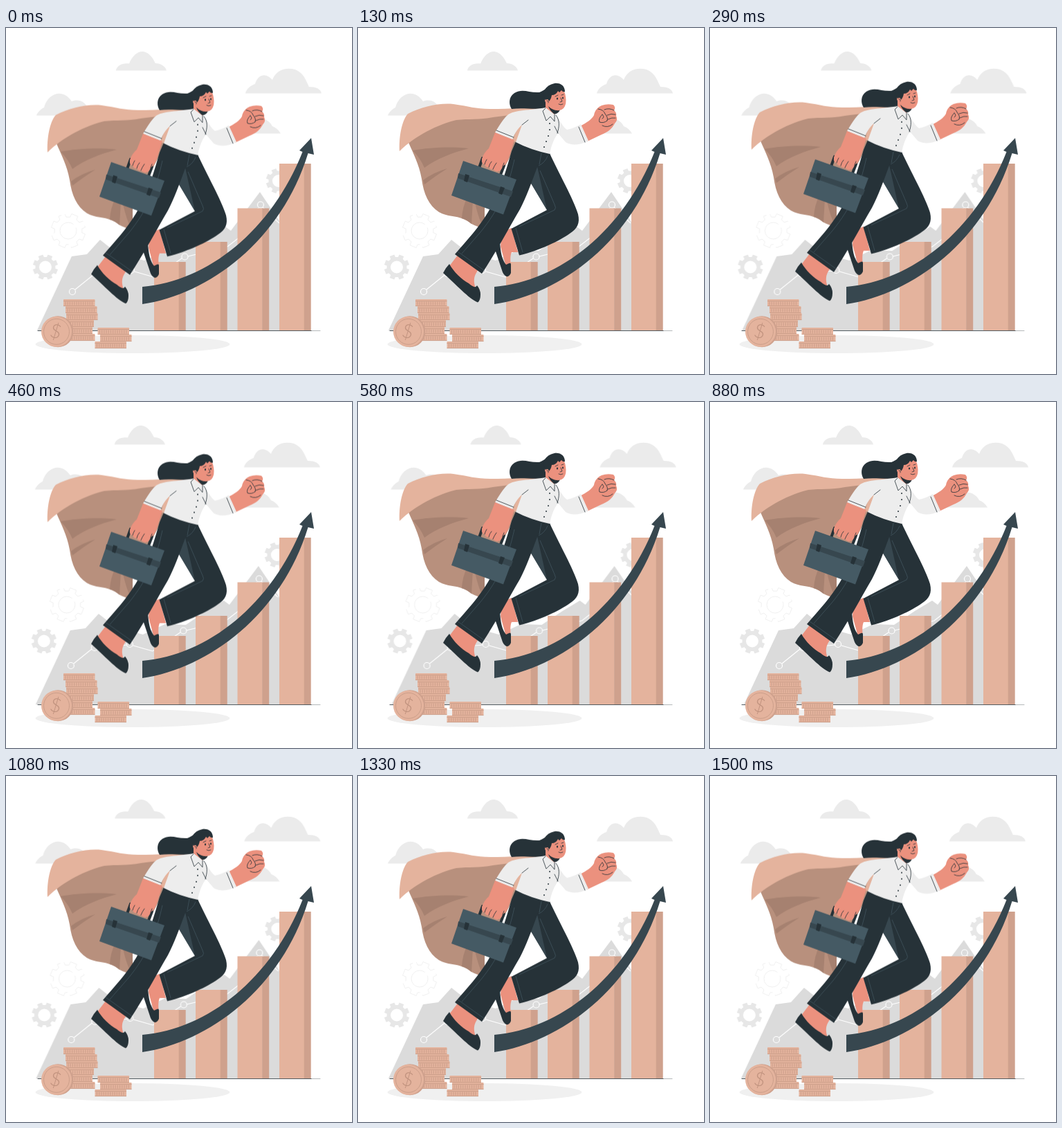
An HTML page for the animation above (1540 ms loop, 500 by 500 pixels).

```html
<!DOCTYPE html>
<html lang="en">
<head>
<meta charset="utf-8">
<title>Growth</title>
<style>
html, body { margin: 0; width: 100%; height: 100%; overflow: hidden; background: #fff; }
svg { display: block; width: 100vw; height: 100vh; }
.cloud { fill: #ebebeb; }
.gear { fill: #e7e7e7; fill-rule: evenodd; }
.ghost { fill: none; stroke: #ececec; stroke-width: .8; stroke-dasharray: 42 6; }
.hill { fill: #dbdbdb; }
.chart { fill: none; stroke: #fff; stroke-width: 1.2; }
.peach { fill: #e4b39d; }
.tan { fill: #cfa18d; }
.inner { fill: #b8907d; }
.fold { fill: #a68170; }
.skin { fill: #eb917e; }
.ink { fill: #263238; }
.slate { fill: #37474f; }
.steel { fill: #455a64; }
.shirt { fill: #ededed; }
.line { fill: none; stroke: #263238; stroke-width: .8; stroke-linecap: round; stroke-linejoin: round; }
.seam { fill: none; stroke: #455a64; stroke-width: .7; }
.mark { fill: none; stroke: #c99c88; stroke-width: .9; }
</style>
</head>
<body>
<svg viewBox="0 0 500 500" xmlns="http://www.w3.org/2000/svg">
  <g id="back">
    <g class="cloud">
      <path d="M159 61.500C160 54 169 50 178 51.500C183 39 191 33.500 198 34C207 35 212 43 216 51C224 51 231 56 232 61.500Z"/>
      <path d="M346 94.500C348 87 354 83 360 81C364 67 376 64 385 75C390 61 404 56 418 60C431 65 434 77 438 85C448 85 455 88 456 94.500Z"/>
      <path d="M44 126.500C46 121 51 117 55 115C60 95 82 86 95 106C106 102 115 107 118 116V126.500Z"/>
      <path d="M325 152.500C340 137 346 130 360 130C374 129 382 135 385 142Q393 145 397 152.500Z"/>
    </g>
    <path class="hill" d="M45 437L95 330L117 327L136 306L160 325L200 336L232 321L262 322L292 302L317 287L325 293L367 237L394 277L430 340V437Z"/>
    <g class="chart">
      <path d="M100 378L126 357M132 355L177 351M186 352L214 360M214 360L254 333M263 330L320 316L338 302L365 260M371 259L395 282"/>
      <circle cx="96" cy="381" r="4.500"/><circle cx="130" cy="355" r="4.500"/><circle cx="181" cy="350" r="4.500"/>
      <circle cx="258.500" cy="330.500" r="4.500"/><circle cx="368" cy="255.500" r="4.500"/>
    </g>
  </g>

  <ellipse cx="183" cy="457" rx="140.500" ry="13" fill="#f0f0f0"/>
  <g id="bars"></g>
  <path class="line" d="M46 437.500H441"/>
  <path class="line" d="M441 437.500H454" style="stroke-width:.35"/>
  <path class="slate" d="M197 374C292 366 384 292 428.500 179L424 177L441 159L445 183L436.500 181C398 307 293 385 197 399Z"/>

  <g id="hero">
    <!-- cape -->
    <path class="inner" d="M72 165C80 184 88 198 92 220C95 242 102 258 117 268C129 275 142 273 152 278C158 280 161 283 164 285Q173 290 183 291V258L232 165L268 118L150 126L100 138Z"/>
    <path class="fold" d="M79 179C101 175 132 173 160 176C137 182 113 191 96 204Q90 190 79 179Z"/>
    <path class="fold" d="M94 222Q108 211 129 205Q113 215 96 228Z"/>
    <path class="fold" d="M150 277Q151 260 158 247L166 251L164 285Q157 279 150 277ZM168 250L183 256V291Q176 286 168 250Z"/>
    <path class="peach" d="M60 180C59 160 63 136 72 126C92 116 116 110 138 112C160 115 170 119 191 119C220 119 245 117 272 117L268 124C240 126 215 128 195 131C175 135 160 133 142 135C116 141 82 158 60 180Z"/>
    <path class="peach" d="M240 139L231 145L223 165L230 168Z"/>

    <!-- rear leg -->
    <path class="skin" d="M207 297L222 291L231 326L222 326C219 333 221 340 220 344L214 347L206 318Z"/>
    <path class="ink" d="M205 311C206 326 208 337 214 344C218 342 221 340 221 344L221 356C218 363 213 363 209 355L198 322Z"/>
    <path class="ink" d="M235 171L277 183C288 208 312 250 318 271C321 284 317 292 306 299C292 309 262 324 233 330.500L221.500 292L273 265L248 223Z"/>
    <path class="slate" d="M259 202L273 265L248 223Z"/>
    <path class="seam" d="M228 291L238 326M233 289L284 265Q287 262 284 257L263 208"/>

    <!-- front leg -->
    <path class="skin" d="M145 329L174 351C166 362 167 368 170 379L155 377L132 346Z"/>
    <path class="ink" d="M132 343C138 354 150 366 160 371C166 376 170 378 172 374Q177 380 177 387Q177 396 173 398.500C160 393 142 373 123 356Q127 348 132 343Z"/>
    <path class="ink" d="M228 166Q249 178 277 184C275 194 268 198 259 203C251 225 242 249 234 264C218 291 199 327 179 357L140 329C158 308 175 290 188 268C206 238 215 204 222 180Z"/>
    <path class="seam" d="M144 325L182 352M226 192C217 233 204 264 177 297L150 328M274 187Q270 197 261 201M265 183L262 199"/>

    <!-- hair behind the head -->
    <path class="ink" d="M281 84C273 87 269 93 262 95C247 96 238 89 226 96C217 102 218 113 222 119C238 117 252 120 277 118L286 100Z"/>

    <!-- far arm -->
    <path class="skin" d="M321 144C330 139 338 134 341 128C342 121 347 116 352 114Q360 111 369 113Q373 117 370 121Q374 124 373 129Q376 135 371 140C367 148 360 153 352 156L331 166Z"/>
    <path class="line" d="M356 120Q363 117 370 121M360 128Q366 125 372 127M361 134Q367 131 372 132M347 119Q355 120 357 126Q362 132 360 136M353 127Q347 133 349 138Q355 140 360 136M353 127Q357 131 353 133M353 143Q361 147 368 141"/>

    <!-- shirt -->
    <path class="shirt" d="M284 125C291 134 295 144 302 149Q312 147 322 141L333 165C319 172 308 172 300 167L289 154C283 162 279 173 277 184Q249 178 228 167L237 142C230 148 226 155 223 164L198 153C204 143 211 132 216 128C225 120 250 121 271 117Z"/>
    <path class="line" d="M319 145L328 167M289 154L284 144M200 150L225 160M237 142L246 135M286 128C292 135 291 145 288 154"/>

    <!-- neck and face -->
    <path class="skin" d="M271 106L291 118L283 128L271 120Z"/>
    <path class="ink" d="M275 115Q283 123 292 120Q289 127 283 126Q277 121 275 115Z"/>
    <path class="skin" d="M272 103Q277 89 293 90Q299 92 300 101Q302 112 297 118Q291 124 282 119Q277 116 276 112Q271 112 270 107Q270 104 272 103Z"/>
    <path class="ink" d="M271 106C265 96 270 85 284 82C293 81 299 86 299 94Q296 95 294 92L291 95L289 93Q286 99 280 99Q279 105 276 108Q275 103 271 106Z"/>
    <path class="line" d="M285 101L289 99M294 99L297 98M293 103L295 108L292 109M290 112Q293 114 296 112M273 107Q276 107 275 110"/>
    <ellipse class="ink" cx="288" cy="104" rx="1.100" ry="1.500"/><ellipse class="ink" cx="296" cy="103" rx="1" ry="1.500"/>
    <path class="shirt" d="M271 117L284 127L284 137L278 132L272 136L267 122Z"/>
    <path class="line" d="M271 118L267 122L272 136L278 130L284 137L284 127"/>
    <g class="ink"><circle cx="277" cy="140" r="1"/><circle cx="277" cy="149" r="1"/><circle cx="275" cy="158" r="1"/><circle cx="272" cy="166" r="1"/><circle cx="269" cy="174" r="1"/></g>

    <!-- briefcase and near arm -->
    <path d="M175 204L180 190L211 201L206 214" fill="none" stroke="#263238" stroke-width="4" stroke-linejoin="round"/>
    <path class="steel" d="M152 194L229 221L210 271.500L135 244Z"/>
    <path class="slate" d="M145 212L224 238L221 246L144 219Z"/>
    <path class="ink" d="M155 213L161 215L158 225L153 223ZM206 231L212 233L208 243L203 241Z"/>
    <path class="skin" d="M198 153L226 164C222 175 220 184 217 192Q214 199 209 202Q207 209 202 209Q198 210 195 206Q191 207 189 203Q184 204 183 199Q178 199 179 191Q182 182 189 176Q193 166 198 153Z"/>
    <path class="line" d="M183 199Q184 195 186 192M189 203Q190 198 193 195M195 206Q197 201 200 197M209 202L211 197"/>
  </g>

  <g id="coins"></g>
</svg>
<script>
const $ = id => document.getElementById(id);

const gear = (x, y, outer, inner, hole, teeth) => {
  const step = Math.PI * 2 / teeth;
  const pts = [];
  for (let i = 0; i < teeth; i++) {
    for (const [r, a] of [[inner, .18], [outer, .25], [outer, .75], [inner, .82]]) {
      const angle = (i + a) * step;
      pts.push((x + r * Math.cos(angle)).toFixed(1) + ' ' + (y + r * Math.sin(angle)).toFixed(1));
    }
  }
  return `M${pts.join('L')}ZM${x - hole} ${y}a${hole} ${hole} 0 1 0 ${2 * hole} 0a${hole} ${hole} 0 1 0 ${-2 * hole} 0Z`;
};

$('back').insertAdjacentHTML('beforeend',
  `<path class="gear" d="${gear(57, 345.5, 18.5, 14.5, 9, 8)}"/>
   <path class="gear" d="${gear(394, 221, 18.5, 14.5, 9, 8)}"/>
   <path class="ghost" d="${gear(90, 293, 25, 20, 12, 8)}"/>`);

$('bars').innerHTML = [[214, 338], [274, 309], [334.5, 260.5], [395, 196]].map(([x, y]) =>
  `<path class="peach" d="M${x} ${y}h36V437h-36Z"/><path class="tan" d="M${x + 35.7} ${y}h10V437h-10Z"/>`).join('');

const coin = ([x, y, w = 45.5]) => {
  let ticks = '';
  for (let i = 3; i < w - 1; i += 3.2) ticks += `M${x + i} ${y + 3.5}v5`;
  return `<rect class="peach" x="${x}" y="${y}" width="${w}" height="10" rx=".8"/>
    <path class="mark" d="M${x} ${y + 2.6}h${w}M${x} ${y + 9.6}h${w}${ticks}"/>`;
};

const stack = [[83, 442], [87, 432, 38], [84, 422, 43], [87, 412], [86, 402], [83, 392],
  [128.5, 453], [136, 443], [132.5, 433]];
$('coins').innerHTML = stack.map(coin).join('') +
  `<circle class="tan" cx="75" cy="438.800" r="22.500"/>
   <circle class="peach" cx="73" cy="438.800" r="22"/>
   <circle class="mark" cx="73" cy="438.800" r="18.500"/>
   <text x="72" y="448" text-anchor="middle" font-family="Lato, sans-serif" font-size="28" font-weight="300"
     fill="#c0927e" transform="rotate(14 72 438)">$</text>`;

const loop = 1540, cycle = 1500, frame = 1000 / 24, lead = 25;

// Linear keyframes from [offset, value] steps; the clock below drives them.
const track = (id, axis, steps) => {
  const anim = $(id).animate(
    steps.map(([offset, v]) => ({ offset, transform: `translate${axis}(${v}px)` })),
    { duration: cycle, fill: 'both' });
  anim.pause();
  return anim;
};

const tracks = [
  track('back', 'X', [[0, 0], [.1, -1], [.2, 2], [.3, -4], [.4, 4], [.5, -4],
    [.6, 4], [.7, -4], [.8, 2], [.9, -1], [1, 0]]),
  track('hero', 'Y', [[0, 0], [.5, -10], [1, 0]])
];

const start = performance.now();
const draw = () => {
  const t = (performance.now() - start) % loop;
  const held = Math.floor((t + 4) / frame) * frame;
  const time = (held + lead) % cycle;
  for (const anim of tracks) anim.currentTime = time;
  requestAnimationFrame(draw);
};
draw();
</script>
</body>
</html>
```
